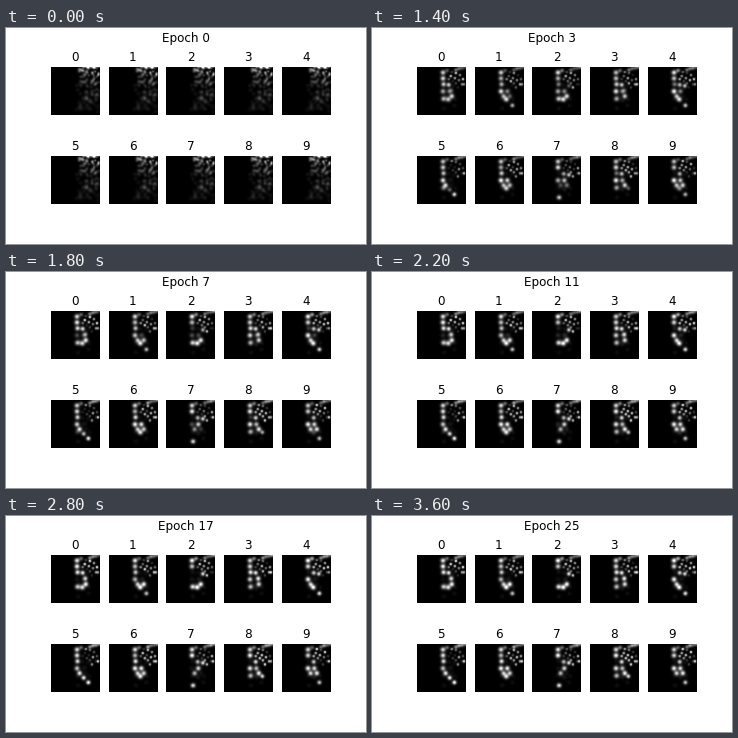
These frames come from a looping animation (360x216 px, 4700 ms). A matplotlib script:

```python
import numpy as np
import matplotlib.pyplot as plt
from matplotlib.animation import FuncAnimation

SIZE = 48
HOLD = 12          # ticks spent on the untrained state
EPOCHS = 25
TICKS = 47

# Shared receptive fields: x, y, width
UNITS = {
    "a": (25.5, 6.5, 1.6), "b": (25.5, 12.3, 1.6), "c": (26, 18, 1.5),
    "d": (25.5, 24.8, 1.6), "e": (31.5, 24.8, 1.5), "f": (36, 19.5, 1.3),
    "g": (28, 29.5, 1.5), "h": (34, 29.5, 1.6), "i": (31, 18.5, 1.4),
    "j": (30.5, 32.5, 1.6), "k": (26, 32, 1.6), "l": (32, 34, 1.4),
    "m": (36.5, 38.5, 1.4), "n": (26.5, 41.5, 1.5), "o": (33.5, 24, 1.5),
    "p": (37.5, 32.5, 1.3),
}
DOTS = [(33, 10), (37, 12), (42, 9), (45, 13), (38, 17), (34, 6), (44, 18),
        (40, 21), (35, 15), (41, 14), (31, 13), (38, 7), (46, 18)]
STREAK = [(38, 4), (41, 2.5), (44, 2), (47, 1), (29.5, 4.5)]

# Units active per class after the first epoch and at the end
EARLY = ["abcidehjk", "abcdegjm", "abcdehjk", "abcdeihk", "abcdeifgjm",
         "abcdgkm", "abcdeghj", "abidefhn", "abcdeihk", "abidehgjm"]
LATE = ["abciohjk", "abcdghjm", "abfhjk", "abcidohk", "abifdgjm",
        "abcdglm", "abcdeghj", "abiefgn", "abidehkp", "abiedghm"]


def blob(x, y, s):
    yy, xx = np.mgrid[:SIZE, :SIZE] + 0.5
    return np.exp(-((xx - x) ** 2 + (yy - y) ** 2) / (2 * s * s))


rng = np.random.default_rng(7)
names = list(UNITS)
fields = np.array([blob(*u) for u in UNITS.values()]
                  + [blob(x, y, 0.85) for x, y in DOTS]
                  + [blob(x, y, 1.3) for x, y in STREAK])


def class_weights(letters, gain, dots, tail):
    on = np.array([n in letters for n in names], float)
    return np.concatenate([0.06 + on * gain, dots, tail])


early, late = [], []
for k in range(10):
    gain = rng.uniform(0.7, 1.0, len(names))
    dots = rng.uniform(0.15, 1.1, len(DOTS))
    tail = rng.uniform(0.35, 0.7, len(STREAK))
    first = 0.8 * gain
    first[names.index("d")] = 1.0
    early.append(class_weights(EARLY[k], first, dots * 0.75, tail * 0.7))
    late.append(class_weights(LATE[k], gain, dots, tail))
early, late = np.array(early), np.array(late)


def untrained():
    """Random cloud, finer and brighter towards the top right."""
    img = np.zeros((SIZE, SIZE))
    for _ in range(110):
        x, y = rng.uniform(24.5, 48), 45 * rng.random() ** 1.25
        reach = np.hypot(48 - x, y) / 50
        s = 0.75 + 0.75 * reach
        level = 0.26 * (1 - y / 60) + 0.55 * np.exp(-y / 9) * (x - 18) / 30
        img += level * rng.uniform(0.3, 1) * blob(x, y, s)
    return img


start = untrained()


def images(epoch):
    if epoch == 0:
        return [start] * 10
    mix = np.exp(-(epoch - 1) / 4.5)
    weights = late + (early - late) * mix
    return np.tensordot(weights, fields, 1)


fig, axes = plt.subplots(2, 5, figsize=(5, 3), dpi=72, facecolor="white")
fig.subplots_adjust(left=0.125, right=0.9, bottom=0.125, top=0.88,
                    wspace=0.2, hspace=0.2)
title = fig.suptitle("Epoch 0", fontsize=12, y=0.98)
panels = []
for k, ax in enumerate(axes.flat):
    panels.append(ax.imshow(start, cmap="gray", vmin=0, vmax=1))
    ax.set_title(str(k), fontsize=12)
    ax.axis("off")


def update(tick):
    epoch = min(max(tick - HOLD + 1, 0), EPOCHS)
    title.set_text(f"Epoch {epoch}")
    for panel, img in zip(panels, images(epoch)):
        panel.set_data(img)
    return [title, *panels]


anim = FuncAnimation(fig, update, frames=TICKS, interval=100,
                     repeat=True, repeat_delay=0, blit=False)
plt.show()
```
